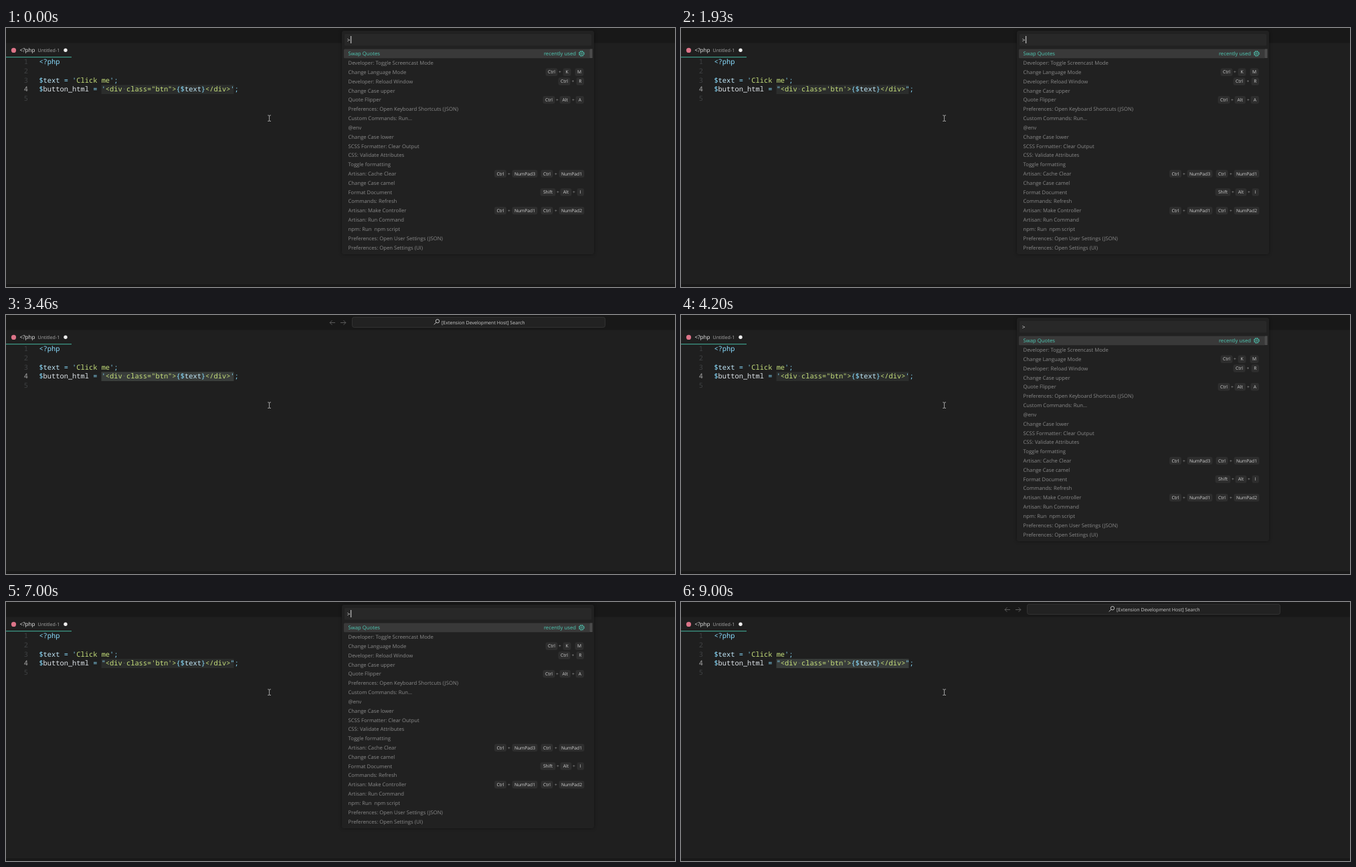
An HTML page for the animation above (9.06 s loop, 1000 by 388 pixels).

```html
<!DOCTYPE html>
<html lang="en">
<head>
<meta charset="utf-8">
<title>Swap quotes</title>
<style>
  html, body { margin: 0; width: 100%; height: 100%; overflow: hidden; background: #1f1f1f; }
  svg { display: block; width: 100vw; height: 100vh; }
  text { font: 7.72px "Open Sans", "Noto Sans", sans-serif; white-space: pre; text-rendering: geometricPrecision; }
  .code { font: 10.36px "Noto Sans Mono", "DejaVu Sans Mono", monospace; }
  .op { fill: #89ddff; }
  .var { fill: #bfe6f7; }
  .str { fill: #c8e27c; }
  .plain { fill: #dfe5ea; }
  .dim { fill: #67706a; }
</style>
</head>
<body>
<svg id="stage" viewBox="0 0 1000 388"></svg>
<script>
const LOOP = 9060, BLINK = 500, SWAP_DELAY = 70, ROW = 13.83;
// Times between which the command palette is open.
const SESSIONS = [[-70, 430], [1600, 2540], [3700, 4260], [6600, 7100], [8000, 8430]];

const COMMANDS = [
  'Swap Quotes', 'Developer: Toggle Screencast Mode', 'Change Language Mode',
  'Developer: Reload Window', 'Change Case upper', 'Quote Flipper',
  'Preferences: Open Keyboard Shortcuts (JSON)', 'Custom Commands: Run...', '@env',
  'Change Case lower', 'SCSS Formatter: Clear Output', 'CSS: Validate Attributes',
  'Toggle formatting', 'Artisan: Cache Clear', 'Change Case camel', 'Format Document',
  'Commands: Refresh', 'Artisan: Make Controller', 'Artisan: Run Command',
  'npm: Run  npm script', 'Preferences: Open User Settings (JSON)', 'Preferences: Open Settings (UI)'
];
// Row: keys as [label, left, width]; '+' has no box.
const SHORTCUTS = {
  2: [['Ctrl', 807, 17], ['+', 826, 4], ['K', 833, 11], ['M', 851, 12]],
  3: [['Ctrl', 826, 17], ['+', 845.5, 4], ['R', 853, 10.5]],
  5: [['Ctrl', 803, 17], ['+', 822, 4], ['Alt', 828, 15.5], ['+', 846, 4], ['A', 852, 11.5]],
  13: numPad(3, 1),
  15: [['Shift', 799, 22], ['+', 823, 4], ['Alt', 829, 16], ['+', 847, 4], ['I', 854, 9.5]],
  17: numPad(1, 2)
};

function numPad(first, second) {
  return [['Ctrl', 730.5, 17], ['+', 750, 4], ['NumPad' + first, 757, 37],
          ['Ctrl', 800, 17], ['+', 820, 4], ['NumPad' + second, 827, 37]];
}

const escapeXml = s => s.replace(/&/g, '&amp;').replace(/</g, '&lt;');
const rect = (x, y, w, h, fill, extra = '') =>
  `<rect x="${x}" y="${y}" width="${w}" height="${h}" fill="${fill}" ${extra}/>`;
const label = (s, x, y, fill, style = '', anchor = 'start') =>
  `<text x="${x}" y="${y}" fill="${fill}" text-anchor="${anchor}" style="${style}">${escapeXml(s)}</text>`;
const stroke = (d, color, width = 0.8) =>
  `<path d="${d}" fill="none" stroke="${color}" stroke-width="${width}"/>`;

const lineY = n => 54 + (n - 1) * ROW;
const codeLine = (n, tokens, id = '') =>
  `<text class="code" x="49.4" y="${lineY(n)}" id="${id}">` +
  tokens.map(([kind, s]) => `<tspan class="${kind}">${escapeXml(s)}</tspan>`).join('') + '</text>';

function buttonLine(outer, inner, id) {
  return codeLine(4, [
    ['op', '$'], ['plain', 'button_html '], ['op', '= ' + outer], ['str', '<div'], ['dim', '·'],
    ['str', `class=${inner}btn${inner}>`], ['op', '{$'], ['var', 'text'], ['op', '}'],
    ['str', '</div>'], ['op', outer + ';']
  ], id);
}

function editor() {
  const numbers = [1, 2, 3, 4, 5].map(n =>
    `<text class="code" x="33" y="${lineY(n)}" text-anchor="end" fill="${n === 4 ? '#a6a6a6' : '#3f4143'}">${n}</text>`);
  return rect(0, 0, 1000, 388, '#1f1f1f') + rect(0, 0, 1000, 22.5, '#181818') +
    rect(0, 384, 1000, 4, '#181818') + rect(0, 43, 98, 1.2, '#3d9c89') +
    '<circle cx="11.5" cy="33.4" r="3.6" fill="#dc7488"/><circle cx="89" cy="33.3" r="2.7" fill="#eee"/>' +
    label('<?php', 20.5, 36.4, '#f0f0f0', 'font-size:8.1px') +
    label('Untitled-1', 47.5, 36.3, '#a8a8a8', 'font-size:7.1px') +
    rect(142.5, 85.2, 198, 13.8, '#393d3b', 'id="selection"') + numbers.join('') +
    codeLine(1, [['op', '<?php']]) +
    codeLine(3, [['op', '$'], ['var', 'text '], ['op', "= '"], ['str', 'Click me'], ['op', "';"]]) +
    buttonLine("'", '"', 'single') + buttonLine('"', "'", 'double') +
    rect(142, 85.4, 1.2, 13.4, '#e8b920', 'id="caret"') +
    stroke('M391.3 130.9H393 L393.6 131.5 L394.2 130.9H396 M393.6 131.2V139.2 M391.3 139.5H393 L393.6 138.9 L394.2 139.5H396', '#c8c8c8');
}

function searchBar() {
  return stroke('M492 11.5H484.2 M487.4 8.2L484.1 11.5L487.4 14.8', '#6c6c6c') +
    stroke('M500 11.5H507.8 M504.6 8.2L507.9 11.5L504.6 14.8', '#6c6c6c') +
    rect(517.5, 3.3, 378, 15.2, '#222', 'rx="3" stroke="#383838" stroke-width=".8"') +
    '<circle cx="645" cy="9.2" r="2.7" fill="none" stroke="#ccc" stroke-width=".9"/>' +
    stroke('M643 11.2L639.8 14.4', '#ccc', 1) +
    label('[Extension Development Host] Search', 651, 13.6, '#ccc', 'font-size:7.1px');
}

function palette() {
  const keys = Object.entries(SHORTCUTS).flatMap(([row, list]) => list.map(([key, x, w]) => {
    const y = 38.4 + row * ROW;
    const box = key === '+' ? '' : rect(x, y - 5.2, w, 10.6, '#2e2e2e', 'rx="1.8" stroke="#333" stroke-width=".6"');
    return box + label(key, x + w / 2, y + 2.4, key === '+' ? '#999' : '#d2d2d2', 'font-size:6.7px', 'middle');
  }));
  const items = COMMANDS.map((name, i) =>
    label(name, 511.5, 41.2 + i * ROW, i ? '#8a8a8a' : '#4fc9b4'));
  return rect(502, 4, 377, 335, '#212121', 'rx="3.5" style="filter:drop-shadow(0 0 2.5px #0006)"') +
    rect(506, 9, 369, 17.6, '#282828', 'rx="1.5"') +
    label('>', 509.8, 20.7, '#ddd', 'font-size:8.3px') + rect(515.2, 12, 1, 11, '#ddd', 'id="inputCaret"') +
    rect(505, 31.4, 368, 13.8, '#393939', 'rx="1.5"') + rect(872.6, 31.4, 4, 13.6, '#4b4b4b') +
    items.join('') + keys.join('') + label('recently used', 852, 41.2, '#4fc9b4', '', 'end') +
    '<g fill="none" stroke="#4fc9b4"><circle cx="860.3" cy="38.3" r="3.2" stroke-width=".9"/>' +
    '<circle cx="860.3" cy="38.3" r="4" stroke-width="1" stroke-dasharray="1.57"/>' +
    '<circle cx="860.3" cy="38.3" r="1.2" stroke-width=".8"/></g>';
}

document.getElementById('stage').innerHTML =
  editor() + `<g id="search">${searchBar()}</g><g id="palette">${palette()}</g>`;

const part = id => document.getElementById(id);
const show = (id, visible) => part(id).setAttribute('visibility', visible ? 'inherit' : 'hidden');
const blinkOn = elapsed => Math.floor(elapsed / BLINK) % 2 === 0;

function draw(t) {
  const [opened, closed] = SESSIONS.filter(([start]) => start <= t).pop();
  const isOpen = t < closed;
  const swaps = SESSIONS.filter(([, end]) => t >= end + SWAP_DELAY).length;
  show('palette', isOpen);
  show('inputCaret', blinkOn(t - opened));
  show('search', !isOpen);
  show('caret', !isOpen && blinkOn(t - closed));
  show('single', swaps % 2 === 0);
  show('double', swaps % 2 === 1);
  part('selection').setAttribute('fill', isOpen ? '#2b2d2c' : '#393d3b');
}

const startTime = performance.now();
function tick() {
  draw((performance.now() - startTime) % LOOP);
  requestAnimationFrame(tick);
}
tick();
</script>
</body>
</html>
```
